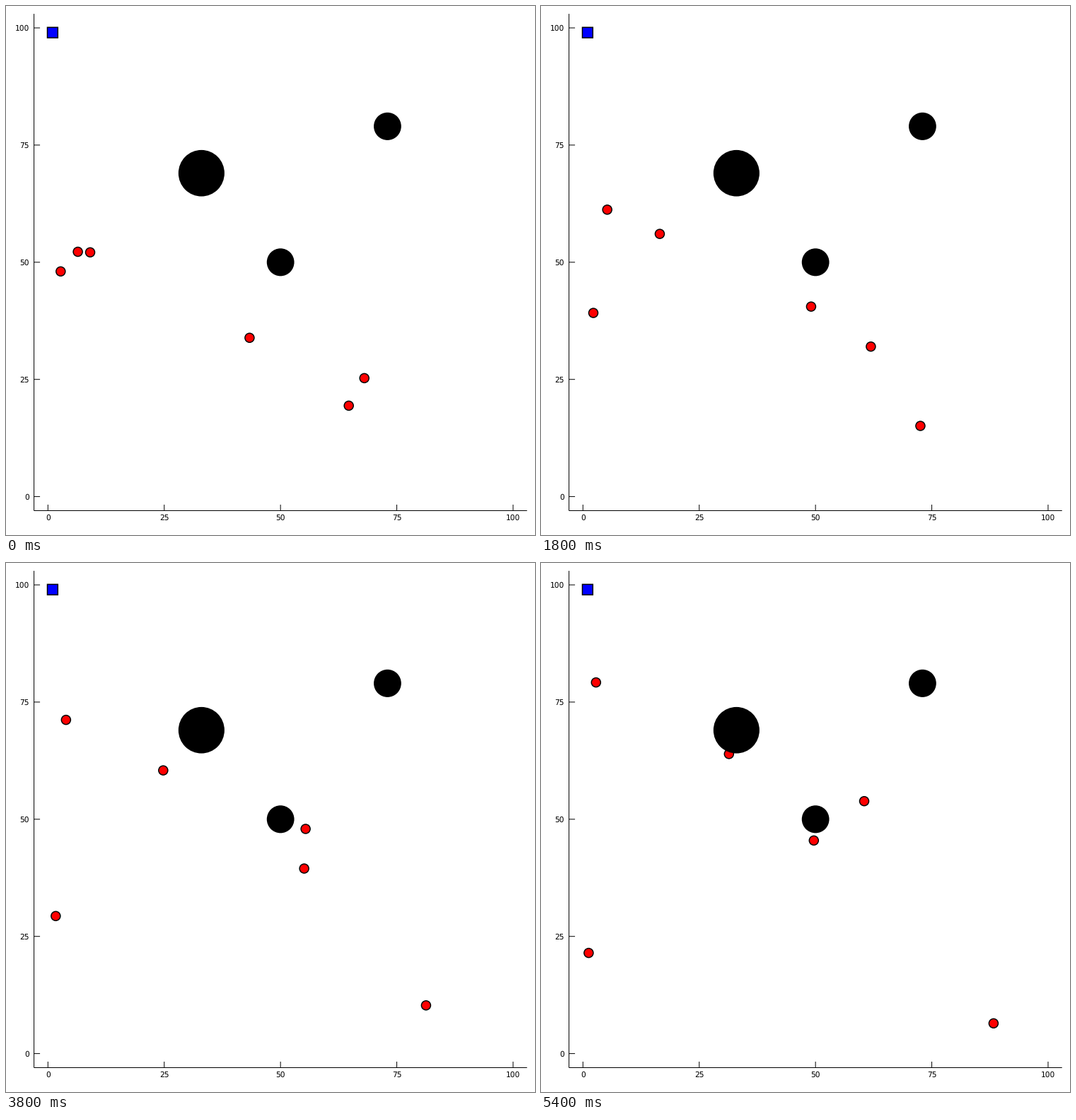
A matplotlib script that plays this animation: 748 by 749 pixels, repeating every 5.6 s.

```python
import matplotlib.pyplot as plt
from matplotlib.animation import FuncAnimation
from matplotlib.patches import Circle, Ellipse, Rectangle

W, H, DPI = 748, 749, 64
PX = 72 / DPI  # points per pixel
FRAMES, STEP_MS = 28, 200
X0, Y0, SX, SY = 59.3, 694.6, 6.577, 6.636  # data origin and scale in pixels
LO, HI = -3, 103

plt.rcParams["font.family"] = "DejaVu Sans"
plt.rcParams["text.hinting"] = "none"


def px(x):
    return X0 + SX * x


def py(y):
    return Y0 - SY * y


fig = plt.figure(figsize=(W / DPI, H / DPI), dpi=DPI, facecolor="white")
ax = fig.add_axes([0, 0, 1, 1])
ax.set(xlim=(0, W), ylim=(H, 0))
ax.axis("off")


def line(xs, ys):
    ax.plot(xs, ys, color="black", lw=PX, solid_capstyle="butt", snap=False)


def label(x, y, value, align):
    ax.text(x, y, str(value), size=10.67 * PX, ha=align, va="baseline")


left, right, top, bottom = px(LO), px(HI), py(HI), py(LO)
line([left, right], [bottom, bottom])
line([left, left], [top, bottom])
for v in range(0, 101, 25):
    line([px(v), px(v)], [bottom, bottom - 8.5])
    line([left, left + 8.5], [py(v), py(v)])
    label(px(v), 728, v, "center")
    label(33, py(v) + 4, v, "right")

# Obstacles: centre and radius in data units
for x, y, r in [(50, 50, 3), (33, 69, 5), (73, 79, 3)]:
    ax.add_patch(Ellipse((px(x), py(y)), 2 * r * SX - 0.7, 2 * r * SY - 0.7,
                         fc="black", ec="none", zorder=4))

# Goal
half = 7.4
ax.add_patch(Rectangle((px(1) - half, py(99) - half), 2 * half, 2 * half,
                       fc="blue", ec="black", lw=1.5 * PX, snap=False,
                       zorder=5))

# Agents walk in straight lines at constant speed: start and end in pixels
AGENTS = [
    ((101.6, 348.0), (77.8, 169.1)),
    ((119.0, 348.8), (265.8, 270.4)),
    ((77.3, 375.8), (67.4, 552.1)),
    ((344.4, 469.8), (457.0, 337.2)),
    ((506.7, 526.9), (385.8, 392.9)),
    ((484.7, 565.9), (639.9, 651.8)),
]
dots = [ax.add_patch(Circle(start, 6.5, fc="red", ec="black",
                            lw=1.5 * PX, zorder=3))
        for start, _ in AGENTS]


def update(i):
    t = i / (FRAMES - 1)
    for dot, (start, end) in zip(dots, AGENTS):
        dot.center = tuple(a + (b - a) * t for a, b in zip(start, end))
    return dots


anim = FuncAnimation(fig, update, frames=FRAMES, interval=STEP_MS,
                     init_func=lambda: update(0), repeat=True, repeat_delay=0)
plt.show()
```
